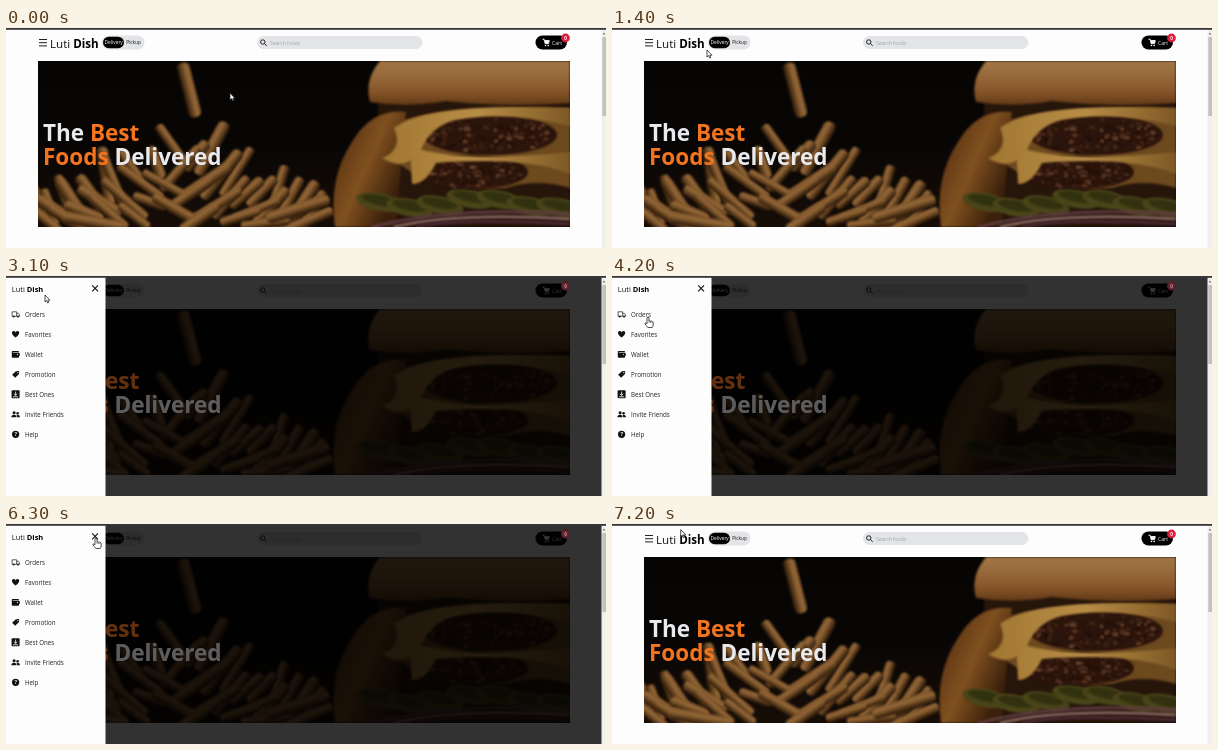
These frames come from a looping animation (600 by 220 pixels, 7300 ms). An HTML page with a canvas:

```html
<!DOCTYPE html>
<html lang="en">
<head>
<meta charset="utf-8">
<title>Food ordering page</title>
<style>
html, body { margin: 0; width: 100%; height: 100%; overflow: hidden; background: #fefdfe; }
canvas { display: block; width: 600px; height: 220px; }
</style>
</head>
<body>
<canvas id="stage" width="600" height="220"></canvas>
<script>
const LOOP = 7300, STEP = 100, OPEN = 2810, CLOSE = 6680, SLIDE = 290;
const MENU_WIDTH = 99.5;
const BRAND = ['Luti ', 'Dish'];
const ITEMS = ['Orders', 'Favorites', 'Wallet', 'Promotion', 'Best Ones', 'Invite Friends', 'Help'];
// Stops of the pointer between which it glides
const STOPS = [
  { t: 0, x: 224, y: 65 },
  { t: 800, x: 127, y: 11 },
  { t: 1400, x: 95, y: 22 },
  { t: 2700, x: 39, y: 19 },
  { t: 3300, x: 39, y: 19 },
  { t: 4200, x: 36, y: 41 },
  { t: 5500, x: 68, y: 110 },
  { t: 6300, x: 90, y: 14 },
  { t: 6700, x: 90, y: 14 },
  { t: LOOP, x: 67, y: 5 }
];

const ctx = document.getElementById('stage').getContext('2d');
let g = ctx;

const clamp = v => Math.min(1, Math.max(0, v));
const ease = v => v * v * (3 - 2 * v);
const mix = (a, b, k) => a + (b - a) * k;

function randomFrom(seed) {
  return () => (seed = (seed * 16807) % 2147483647) / 2147483647;
}
function text(str, x, y, size, color, weight = 400) {
  g.font = `${weight} ${size}px "Open Sans", "Noto Sans", sans-serif`;
  g.fillStyle = color;
  g.fillText(str, x, y);
  return x + g.measureText(str).width;
}
function rect(x, y, w, h, color) {
  g.fillStyle = color;
  g.fillRect(x, y, w, h);
}
function pill(x, y, w, h, color, r = h / 2) {
  g.fillStyle = color;
  g.beginPath();
  g.roundRect(x, y, w, h, r);
  g.fill();
}
function disc(x, y, rx, color, ry = rx, turn = 0) {
  g.fillStyle = color;
  g.beginPath();
  g.ellipse(x, y, rx, ry, turn, 0, 7);
  g.fill();
}
function shape(d, fill, stroke, width = 1) {
  const p = new Path2D(d);
  if (fill) { g.fillStyle = fill; g.fill(p); }
  if (stroke) { g.strokeStyle = stroke; g.lineWidth = width; g.stroke(p); }
}
function at(x, y, draw, turn = 0) {
  g.save();
  g.translate(x, y);
  g.rotate(turn);
  draw();
  g.restore();
}
function ramp(x1, y1, x2, y2, ...colors) {
  const fill = g.createLinearGradient(x1, y1, x2, y2);
  colors.forEach((c, i) => fill.addColorStop(i / (colors.length - 1), c));
  return fill;
}

function drawFry(x, y, length, width, turn) {
  const h = width / 2;
  at(x, y, () => {
    pill(-length / 2, -h, length, width, ramp(0, -h, 0, h, '#7a5228', '#946839', '#61401d', '#271609'), h * 0.8);
  }, turn);
}

// A mound of fries: upright at the back, flatter towards the front
function drawFries(random) {
  const count = 46;
  drawFry(183, 62, 56, 13, 1.32);
  for (let i = 0; i < count; i++) {
    const depth = i / count;
    const x = mix(34, 312, (i * 0.618) % 1);
    const crest = 178 - 70 * Math.exp(-(((x - 172) / 82) ** 2));
    const lean = x < 172 ? 1 : -1;
    const turn = lean * mix(1.25, 0.3, depth) + random() * 0.5 - 0.25;
    drawFry(x, mix(crest, 196, depth), mix(34, 64, random()), mix(9, 13, random()), turn);
  }
  drawFry(292, 181, 66, 12, -0.3);
}

function drawPatty(x, y, rx, ry, random) {
  disc(x, y, rx, '#2b140b', ry);
  const tones = ['#4b2b1a', '#6a432c', '#200e08', '#3b2014'];
  for (let i = 0; i < 120; i++) {
    const a = random() * 2 * Math.PI, r = Math.sqrt(random()) * 0.93;
    disc(x + Math.cos(a) * r * rx, y + Math.sin(a) * r * ry, mix(1, 3.5, random()), tones[i % 4], mix(0.8, 2, random()));
  }
}

function drawBurger(random) {
  rect(372, 70, 192, 129, '#25150a');
  shape('M329 199 Q322 150 346 114 Q366 80 400 84 L390 199Z',
    ramp(328, 120, 396, 150, '#5a3212', '#80501f', '#3b200b'));
  for (let x = 374; x < 580; x += 30) {
    disc(x, 175 + 5 * Math.sin(x), 24, '#4a4519', 9, 0.2);
    disc(x, 173 + 5 * Math.sin(x), 18, '#32310f', 5, 0.2);
  }
  ['#5d3a40', '#86635f', '#4b2a34'].forEach((color, i) =>
    shape(`M${366 + i * 22} 199 Q450 ${178 + i * 6} 564 ${186 + i * 5}`, null, color, 3));

  const cheese = ramp(380, 0, 564, 0, '#a37733', '#b78d46', '#7e5925');
  shape('M398 92 Q440 78 564 80 V160 Q530 150 500 160 Q420 164 384 128Z', '#6d491e');
  drawPatty(484, 107, 67, 20, random);
  drawPatty(466, 144, 56, 17, random);
  shape('M388 100 Q420 74 564 80 V98 Q500 82 450 92 Q424 98 414 124 Q398 144 376 130 Q398 122 388 100Z', cheese);
  shape('M404 118 Q450 136 564 124 V146 Q520 128 430 135 Q420 156 406 156Z', cheese);
  shape('M374 33 Q358 52 364 74 Q400 80 440 73 Q500 80 564 75 V33Z',
    ramp(0, 33, 0, 79, '#a27646', '#97693a', '#86552a', '#5c3514'));
}

function makePhoto() {
  const photo = document.createElement('canvas');
  photo.width = 600;
  photo.height = 220;
  g = photo.getContext('2d');
  g.beginPath();
  g.rect(32, 33, 532, 166);
  g.clip();
  rect(32, 33, 532, 166, ramp(0, 33, 0, 199, '#060504', '#080605', '#170d07'));
  g.filter = 'blur(1px)';
  const random = randomFrom(41);
  drawFries(random);
  drawBurger(random);
  g = ctx;
  return photo;
}
const photo = makePhoto();

function drawCart() {
  shape('M0 0 H1.6 L2.6 4.5 H6 L6.8 1.3 H2', '#fff', '#fff', 0.8);
  disc(3, 6.3, 0.8, '#fff');
  disc(5.7, 6.3, 0.8, '#fff');
}

function drawHeadline(white, orange) {
  text('Best', text('The ', 37, 113, 22.5, white, 700), 113, 22.5, orange, 700);
  text('Delivered', text('Foods ', 37, 137, 22.5, orange, 700), 137, 22.5, white, 700);
}

function drawBadge(color, ink) {
  disc(559.5, 10, 4.4, color);
  text('0', 558.2, 11.7, 4.6, ink, 700);
}

function drawBrand(x, y, size) {
  text(BRAND[1], text(BRAND[0], x, y, size, '#111'), y, size, '#000', 700);
}

function drawPage() {
  rect(0, 0, 600, 220, '#fefdfe');
  for (let i = 0; i < 3; i++) rect(33, 11 + i * 3.2, 8, 1, '#222');
  drawBrand(44, 19.5, 11.6);

  pill(96, 7.5, 42.5, 14, '#e3e4e8');
  pill(97, 8.7, 21, 11.6, '#000');
  text('Delivery', 98.4, 16.2, 4.9, '#fff');
  text('Pickup', 120.3, 16.2, 4.7, '#111');

  pill(251, 8, 165.5, 13, '#e3e4e8');
  shape('M259 14 A2.2 2.2 0 1 1 254.6 14 A2.2 2.2 0 1 1 259 14 M258.4 15.5 L260.8 17.9', null, '#222');
  text('Search foods', 264, 16.8, 5, '#a0a4ad');

  pill(529.5, 7.5, 31.5, 14, '#000');
  at(536.5, 11.2, drawCart);
  text('Cart', 546, 16.8, 5.1, '#fff');
  drawBadge('#dc1f3c', '#fff');

  g.drawImage(photo, 0, 0);
  drawHeadline('#e9eaed', '#f4731d');
}

const ICONS = [
  () => {
    shape('M-3.5 -2.5 H1 V2 H-3.5Z M1 -1 H2.8 L4 .6 V2 H1', null, '#333', 0.8);
    disc(-1.8, 2.3, 1.1, '#333');
    disc(2.4, 2.3, 1.1, '#333');
  },
  () => shape('M0 3.3 C-5 -.2 -4 -3.2 -1.9 -3.2 Q-.5 -3.2 0 -1.9 Q.5 -3.2 1.9 -3.2 C4 -3.2 5 -.2 0 3.3Z', '#111'),
  () => {
    pill(-3.8, -3.2, 7.2, 6.6, '#111', 0.8);
    rect(-2.8, -2.3, 6.2, 0.6, '#eee');
    pill(0.5, -1, 3.8, 2.4, '#111', 0.5);
    disc(1.9, 0.2, 0.6, '#fff');
  },
  () => {
    shape('M3.6 -3.2 L.3 -3 L-3.5 .5 L-.4 3.5 L3.4 -.2Z', '#111');
    disc(2.2, -1.7, 0.6, '#fff');
  },
  () => {
    pill(-4, -4, 8, 8, '#111', 1);
    shape('M0 -2.7 V1 M-1.6 -.5 L0 1.2 L1.6 -.5 M-2.6 2.5 H2.6', null, '#fff', 0.8);
  },
  () => {
    disc(-1.5, -1.6, 1.5, '#111');
    disc(2, -1.1, 1.2, '#111');
    shape('M-4.3 3 Q-4.3 .4 -1.5 .4 Q1 .4 1 3Z M1.6 3 Q1.6 1.4 .9 .6 Q4.3 -.2 4.5 3Z', '#111');
  },
  () => {
    disc(0, 0, 3.6, '#111');
    text('?', -1.2, 2, 5.4, '#fff', 700);
  }
];

function drawMenu(x) {
  at(x, 0, () => {
    rect(0, 0, MENU_WIDTH, 220, '#fefdfe');
    drawBrand(5.8, 15.6, 7.5);
    shape('M86.2 9.3 L92 15.4 M92 9.3 L86.2 15.4', null, '#111', 1.1);
    ITEMS.forEach((label, i) => {
      const y = 38.3 + i * 20;
      at(9.6, y, ICONS[i]);
      text(label, 19, y + 2.4, 6.2, '#222');
    });
  });
}

function drawScrollbar() {
  rect(595.5, 0, 4.5, 220, '#f1f0f1');
  rect(596.3, 9, 3.7, 79, '#c2c1c2');
  shape('M596.5 6.5 L598 4.5 L599.5 6.5Z', '#777');
  rect(0, 0, 600, 1.8, '#38363a');
}

const ARROW = 'M0 0 V7 L1.6 5.6 L2.7 8 L3.8 7.5 L2.8 5.2 H4.9Z';
const HAND = 'M-1 .7 Q0 -.5 1 .7 V4 Q2 3.4 2.6 4.2 Q3.6 3.7 4.1 4.6 Q5 4.3 5.2 5.5 V8 Q5 9.2 4.2 10.5 H-.2 Q-1.4 8.8 -3 6.9 Q-3.2 5.6 -2 5.9 L-1 6.8Z';

function drawPointer(t, open) {
  const next = STOPS.findIndex(stop => stop.t > t);
  const a = STOPS[next - 1], b = STOPS[next];
  const k = ease((t - a.t) / (b.t - a.t));
  const x = mix(a.x, b.x, k), y = mix(a.y, b.y, k);
  const overItem = x < 62 && y > 33, overClose = x > 84 && y < 20;
  const hand = open && (overItem || overClose);
  at(x, y, () => {
    shape(hand ? HAND : ARROW, '#fff', '#222', 0.8);
    if (hand) shape('M1 4 V6 M2.6 4.2 V6 M4.1 4.6 V6', null, '#222', 0.5);
  });
}

function draw(now) {
  const t = Math.floor((now % LOOP) / STEP) * STEP;
  const open = t >= OPEN && t < CLOSE;
  const slide = ease(clamp((t - OPEN) / SLIDE)) - ease(clamp((t - CLOSE) / SLIDE));
  const menuX = -600 * (1 - slide);

  drawPage();
  if (open) {
    rect(0, 0, 600, 220, 'rgba(0,0,0,0.8)');
    drawHeadline('#5e5b5d', '#63300f');
    drawBadge('#65202a', '#aaa');
  }
  if (menuX > -MENU_WIDTH) drawMenu(menuX);
  drawScrollbar();
  drawPointer(t, open);
}

const start = performance.now();
function tick() {
  draw(performance.now() - start);
  requestAnimationFrame(tick);
}
tick();
</script>
</body>
</html>
```
